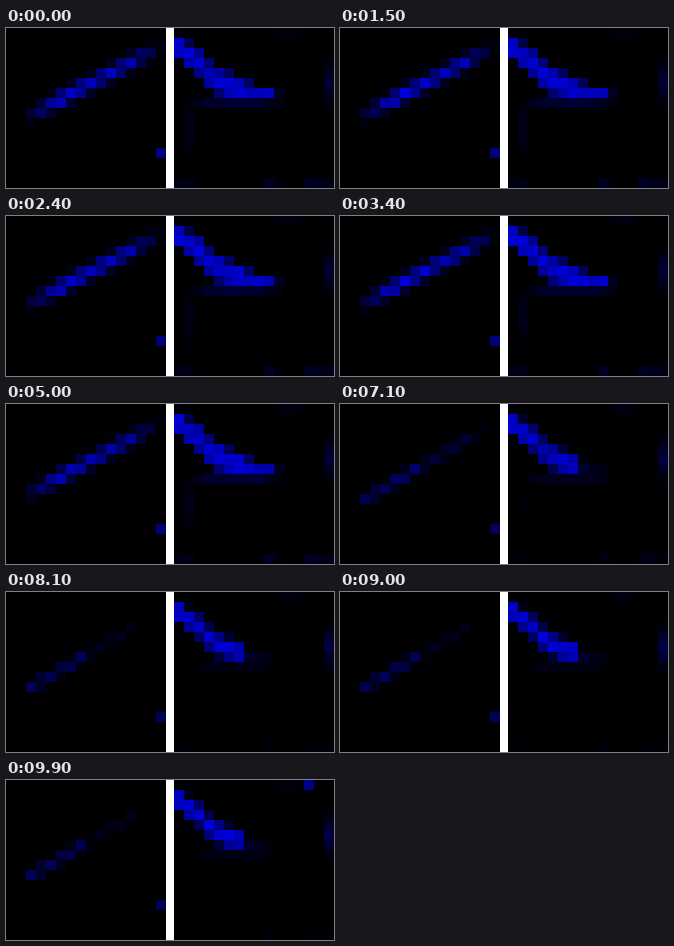
Animation, 328 px wide and 160 px high, one loop 10000 ms. Source, as a matplotlib script:

```python
import numpy as np
import matplotlib.pyplot as plt
from matplotlib.animation import FuncAnimation

W, H, CELL, N = 328, 160, 10, 16
GAP = slice(160, 168)
FRAMES, STEP = 100, 100

ROW, COL = np.mgrid[:N, :N]
COLS = np.arange(N)


def ease(t, start, end):
    u = np.clip((t - start) / (end - start), 0, 1)
    return u * u * (3 - 2 * u)


def mix(a, b, u):
    return a + (b - a) * u


def band(center, width, power=2):
    """Falloff above and below a ridge that runs across the columns."""
    return np.exp(-np.abs((ROW - center) / width) ** power)


def spot(row, col, height=0.4, width=0.4):
    return np.exp(-((ROW - row) / height) ** 2 - ((COL - col) / width) ** 2)


def left_grid(t):
    # the streak dims, tilts and slides down its own line
    fade = ease(t, 3.8, 8.4)
    tilt = ease(t, 4.4, 6.4)
    center = mix(9.2 - 0.52 * COLS, 10.2 - 0.58 * COLS, tilt)
    early = np.interp(COLS, (1, 3, 5, 12, 15), (0, 110, 215, 175, 15))
    late = np.interp(COLS, (1, 2, 7, 8, 12, 13), (0, 85, 85, 25, 28, 0))
    grid = mix(early, late, fade) * band(center, mix(0.75, 0.6, tilt))
    return grid + mix(120, 85, fade) * spot(12, 15)


def right_grid(t):
    # thick core stays, the tail beyond it goes out
    fade = ease(t, 4.6, 7)
    thin = ease(t, 5, 8.5)
    center = np.interp(COLS, (0, 2, 3, 4, 6, 8), (1.5, 3, 4.1, 4.85, 5.5, 6))
    width = np.interp(COLS, (0, 2, 5, 8), (1.15, 1.3, 1.25, 0.6))
    tail = np.interp(COLS, (6, 7, 9, 10, 11), (205, 190, 180, 35, 0))
    stub = np.interp(COLS, (6, 7, 10), (200, 40, 0))
    grid = mix(tail, stub, fade) * band(center, width * mix(1, 0.85, thin), 4)
    # soft glow under the streak
    under = np.interp(COLS, (1, 3, 8, 11), (0, 1, 1, 0))
    grid += mix(45, 18, thin) * under * band(7, 0.7)
    grid += mix(24, 0, thin) * spot(9.5, 1, 2.5, 0.7)
    # borders
    grid += mix(50, 65, thin) * spot(5, 15, 1.6)
    grid += 18 * spot(0, 11, 0.4, 1.2)
    grid += 130 * ease(t, 9, 9.8) * spot(0, 13)
    rim = np.random.default_rng(5).uniform(-30, 35, N).clip(0)
    grid[-1] += rim * mix(1, 0.3, thin)
    return grid


def flicker(grid, rng):
    wobble = rng.normal(0, 0.05, grid.shape)
    level = np.clip(grid * (1 + wobble), 0, 220)
    return np.where(level < 7, 0, level)


def stage(frame):
    t = frame * STEP / 1000
    rng = np.random.default_rng(700 + frame)
    block = np.ones((CELL, CELL))
    img = np.zeros((H, W, 3), np.uint8)
    img[:, :GAP.start, 2] = np.kron(flicker(left_grid(t), rng), block)
    img[:, GAP.stop:, 2] = np.kron(flicker(right_grid(t), rng), block)
    img[:, GAP] = 255
    return img


fig = plt.figure(figsize=(W / 100, H / 100), dpi=100, facecolor="black")
ax = fig.add_axes([0, 0, 1, 1])
ax.axis("off")
view = ax.imshow(stage(0), interpolation="nearest", aspect="auto")


def update(frame):
    view.set_data(stage(frame))
    return [view]


anim = FuncAnimation(fig, update, frames=FRAMES, interval=STEP,
                     repeat=True, repeat_delay=0, blit=False)
plt.show()
```
